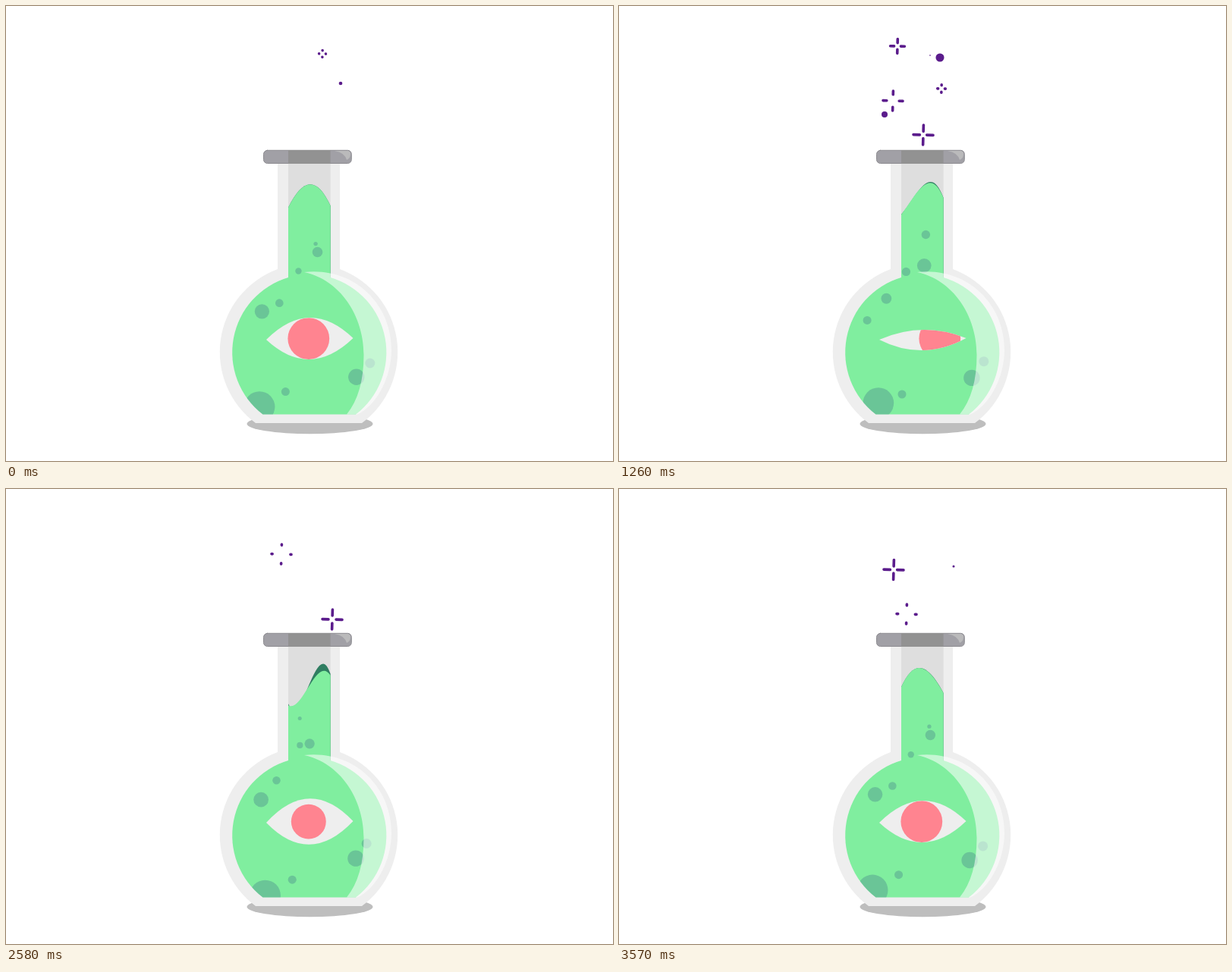
Recreate the animation shown at these times as an HTML page with a canvas. Size 800 px wide and 600 px high, loop 3600 ms.

```html
<!DOCTYPE html>
<html lang="en">
<head>
<meta charset="utf-8">
<title>Potion flask</title>
<style>
  html, body { margin: 0; width: 100%; height: 100%; overflow: hidden; background: #fff; }
  canvas { display: block; width: 800px; height: 600px; }
</style>
</head>
<body>
<canvas id="stage"></canvas>
<script>
const LOOP = 3600, SPARK_LOOP = 1800, WAVE = 1200, TAU = Math.PI * 2;
const PURPLE = '#5b1c8c', GREEN = '#80ee9f', GLASS = '#eeeeee';
const NECK_L = 372, NECK_R = 427.6;

const canvas = document.getElementById('stage');
const ctx = canvas.getContext('2d');
const scale = window.devicePixelRatio || 1;
canvas.width = 800 * scale;
canvas.height = 600 * scale;
ctx.scale(scale, scale);

// Each bubble swings about a home point; peaks are fractions of the loop
const bubble = (x, y, r, sway, peakX, bob, peakY, turns = 1, swell = 0) =>
  ({ x, y, r, sway, peakX, bob, peakY, turns, swell });
const BUBBLES = [
  bubble(339.5, 529, 20.3, 5.5, .53, 7, .74),
  bubble(373, 512, 5.5, 5.7, .6, 4.3, .6),
  bubble(462, 488.6, 10.7, 3, .37, 2.2, .4, 2),
  bubble(478.7, 469, 6.5, 3.6, .2, 2.3, .08),
  bubble(333, 409.5, 8.1, 6, .88, 6.8, .47, 1, -2.6),
  bubble(356, 387, 5.9, 4.5, .95, 5, .06, 1, 1),
  bubble(404, 335, 7.7, 7, .06, 10.5, .48, 1, 1.6),
  bubble(399, 307, 3.8, 12.5, .94, 7.5, .04, 2, 1.9),
  bubble(385, 345, 4.7, 6.8, .62, 8.5, .42, 2, .9)
];

// x, y, start
const STARS = [
  [417, 63, -30], [399.5, 126.5, 160], [363, 86, 300], [430, 172, 445],
  [361, 125, 850], [401, 170, 940], [367, 53, 1060], [425, 109, 1185],
  [379, 165, 1300], [362, 106.5, 1450]
];
const DOTS = [
  [371, 46.7, 258], [360, 151, 350], [412, 121, 450], [423, 68, 1056],
  [350, 143, 1112], [410, 65, 1230], [417.5, 161.5, 1529], [398.5, 120, 1622],
  [392, 169, 1715], [432, 166, 1963], [434, 111, 2755], [395, 82, 2855],
  [441, 102, 3514]
];

const clamp = v => Math.max(0, Math.min(1, v));
const mix = (a, b, k) => a + (b - a) * k;
const swing = (t, peak, turns = 1) => Math.cos(TAU * turns * (t / LOOP - peak));

function ease(t, from, to) {
  const u = clamp((t - from) / (to - from));
  return u * u * (3 - 2 * u);
}
const pulse = (t, a, b, c, d) => ease(t, a, b) - ease(t, c, d);

function fill(color, shape) {
  ctx.fillStyle = color;
  ctx.fill(shape);
}

function rect(color, x, y, w, h) {
  ctx.fillStyle = color;
  ctx.fillRect(x, y, w, h);
}

function disc(x, y, r, color) {
  const p = new Path2D();
  p.arc(x, y, r, 0, TAU);
  fill(color, p);
}

const shadow = new Path2D();
shadow.ellipse(400.5, 551, 83, 13.2, 0, 0, TAU);
const flask = new Path2D('M358 200H440V347A116.5 116.5 0 0 1 469 550H329A116.5 116.5 0 0 1 358 347Z');
const liquid = new Path2D(`M${NECK_L} 358A103 103 0 0 0 338.5 538.5H461A103 103 0 0 0 ${NECK_R} 358Z`);
const inside = new Path2D(liquid);
inside.rect(NECK_L, 190, NECK_R - NECK_L, 169);
const shine = new Path2D('M393 351C460 344 508 394 508 453C508 494 485 529 463 538.5H449C464 520 471.5 494 471.5 460C471.5 408 440 361 393 351Z');
const cap = new Path2D();
cap.roundRect(339.5, 190.3, 115.8, 17.2, 5);
const glint = new Path2D('M433 191Q446 193 449 203Q454 201 454 195Q454 191 450 191Z');

// One sloshing curve across the neck; ripple bends it for the far edge
function surface(t, ripple) {
  const a = TAU * t / WAVE;
  const level = 272.5 - 8.5 * Math.cos(a - .35);
  const bulge = 8 + 11 * Math.cos(a) + 20 * Math.cos(2 * a);
  const tilt = -1 - 9 * Math.sin(a) - 12 * Math.sin(2 * a);
  const bend = ripple * Math.sin(a) ** 2;
  const left = level - tilt - bend / 13, right = level + tilt - bend / 13;
  const third = (NECK_R - NECK_L) / 3;
  const p = new Path2D();
  p.moveTo(NECK_L, 360);
  p.lineTo(NECK_L, left);
  p.bezierCurveTo(NECK_L + third, left - bulge - tilt + bend,
                  NECK_R - third, right - bulge + tilt - bend, NECK_R, right);
  p.lineTo(NECK_R, 360);
  p.closePath();
  return p;
}

function drawBubble(b, t) {
  disc(b.x + b.sway * swing(t, b.peakX, b.turns),
       b.y + b.bob * swing(t, b.peakY, b.turns),
       b.r + b.swell * swing(t, .35), 'rgba(65,120,135,.35)');
}

function drawEye(t) {
  const squint = pulse(t, 600, 1000, 1400, 1770);
  const wide = pulse(t, 1400, 1900, 2400, 2700);
  const shrink = pulse(t, 1770, 2130, 2400, 2700);
  const droop = pulse(t, 2700, 2940, 2940, 3200);
  const up = 28 - 16 * squint + 8 * wide - 20 * droop;
  const low = 27 - 12 * squint + 8 * wide;
  const p = new Path2D(`M343 440Q400 ${439 - 2 * up} 457.5 438Q400 ${439 + 2 * low} 343 440Z`);
  fill(GLASS, p);
  ctx.save();
  ctx.clip(p);
  disc(398.8 + 24 * squint, 438.6, 27.4 - 12.8 * shrink, '#ff8490');
  ctx.restore();
}

// Arms grow outwards, then retract towards their tips
function drawStar(x, y, age) {
  if (age < 0 || age >= 500) return;
  const outer = mix(4.4, 13, clamp((age - 50) / 260));
  const inner = mix(4.4, 13, clamp((age - 310) / 190) ** 1.3);
  ctx.save();
  ctx.translate(x, y);
  ctx.rotate(.03);
  ctx.lineWidth = 3.6 * clamp(age / 30);
  ctx.beginPath();
  for (let arm = 0; arm < 4; arm++) {
    ctx.rotate(TAU / 4);
    ctx.moveTo(inner, 0);
    ctx.lineTo(outer + .01, 0);
  }
  ctx.stroke();
  ctx.restore();
}

// Dots swell steadily and then pop
function drawDot(x, y, age) {
  if (age < 245) disc(x, y, age * .027, PURPLE);
}

function drawFlask() {
  fill('#bebebe', shadow);
  fill(GLASS, flask);
  fill('#a1a0a6', cap);
  fill('#bababb', glint);
  ctx.strokeStyle = '#8d8c91';
  ctx.lineWidth = 1;
  ctx.stroke(cap);
  rect('#929292', NECK_L, 190, NECK_R - NECK_L, 18);
  rect('#dedede', NECK_L, 208, NECK_R - NECK_L, 152);
}

function draw(t) {
  rect('#fff', 0, 0, 800, 600);
  drawFlask();
  fill('#2f7d61', surface(t, 40));
  fill(GREEN, surface(t, 0));
  fill(GREEN, liquid);
  ctx.save();
  ctx.clip(inside);
  for (const b of BUBBLES) drawBubble(b, t);
  ctx.restore();
  fill('rgba(255,255,255,.54)', shine);
  drawEye(t);

  ctx.strokeStyle = PURPLE;
  ctx.lineCap = 'round';
  for (const [x, y, start] of STARS) drawStar(x, y, t % SPARK_LOOP - start);
  for (const [x, y, start] of DOTS) drawDot(x, y, (t - start + LOOP) % LOOP);
}

const begin = performance.now();
function tick() {
  draw((performance.now() - begin) % LOOP);
  requestAnimationFrame(tick);
}
tick();
</script>
</body>
</html>
```
